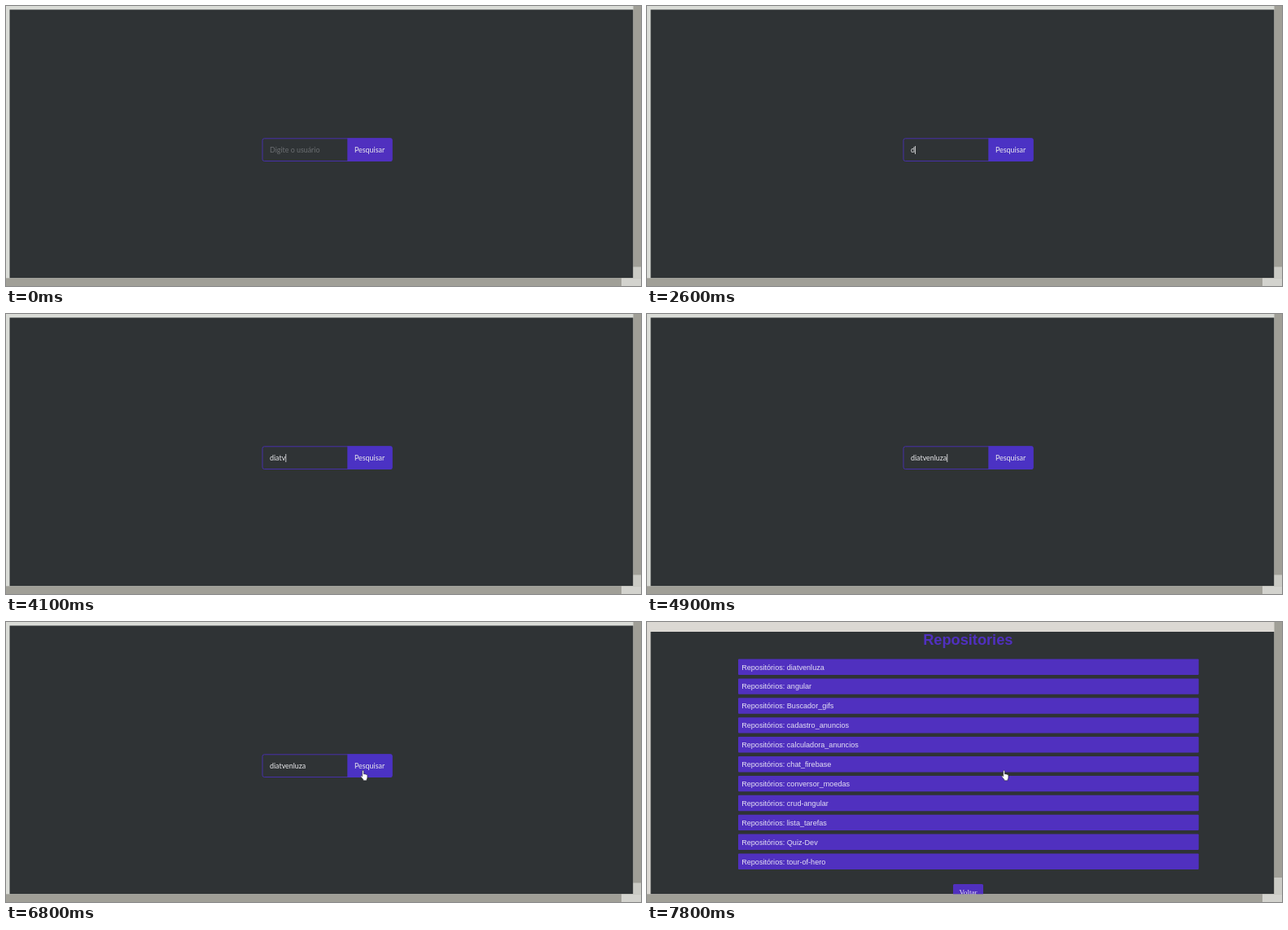
Animation of 780x344 px, one loop 8 s. Source, as an HTML page:

```html
<!DOCTYPE html>
<html lang="pt-BR">
<head>
<meta charset="utf-8">
<title>Buscador de repositórios</title>
<style>
  html, body { margin: 0; width: 100%; height: 100%; overflow: hidden; background: #dadcd7; }
  svg { display: block; width: 780px; height: 344px; }
  .field { font: 8.9px Lato, sans-serif; fill: #e9e9ec; }
  .hint { fill: #6c6f72; }
  .row { font: 9.1px "Liberation Sans", Arial, sans-serif; fill: #e6e2f5; }
  .title { font: bold 18.2px "Liberation Sans", Arial, sans-serif; fill: #5030bf; }
  .back { font: 9.1px "Liberation Serif", Times, serif; fill: #e6e2f5; }
  .accent { fill: #5030bf; }
  .pointer path { fill: #fff; stroke: #1b1b1d; stroke-width: .5; stroke-linejoin: round; }
</style>
</head>
<body>
<svg viewBox="0 0 780 344">
  <rect id="page" width="780" height="344"/>
  <rect id="stage" x="4.5" width="766" fill="#2f3335"/>

  <g id="search">
    <rect x="315" y="162.8" width="159" height="27.7" rx="2.3" fill="none" stroke="#4630a8"/>
    <path id="button" d="M419.3 162.3H472.4a2.3 2.3 0 0 1 2.3 2.3V188.7a2.3 2.3 0 0 1-2.3 2.3H419.3z"/>
    <text class="field" x="428" y="180">Pesquisar</text>
    <text id="hint" class="field hint" x="324" y="180">Digite o usuário</text>
    <text id="typed" class="field" x="324" y="180"></text>
    <path id="spell" d="M328 181.2H367" stroke="#b3294e" stroke-width=".9" stroke-dasharray="1.4 .8" opacity=".75"/>
    <rect id="caret" y="172" width=".8" height="10" fill="#e9e9ec"/>
  </g>

  <g id="results">
    <text class="title" x="394.3" y="28" text-anchor="middle">Repositories</text>
    <g id="rows"></g>
    <rect class="accent" x="376" y="322" width="37" height="20" rx="1.5"/>
    <text class="back" x="394.5" y="335" text-anchor="middle">Voltar</text>
  </g>

  <rect x="770.5" width="9.5" height="344" fill="#a09f97"/>
  <rect y="334.3" width="780" height="9.7" fill="#a09f97"/>
  <rect id="track" x="770.5" width="9.5" fill="#cbcbc5"/>
  <rect x="756" y="334.3" width="24" height="9.7" fill="#d3d3ce"/>

  <g id="pointer" class="pointer">
    <path id="arrow" d="M0 0V10.5L2.5 8.2 4.1 11.8 5.6 11.1 4 7.6H7.3z"/>
    <path id="hand" d="M0 .9a.9.9 0 0 1 1.8 0V4.6q1-.6 1.6.2 1-.5 1.6.4 1.3-.3 1.3 1.1v2.4q0 1.4-.8 2.3V12.5H1.2V11.3L-1.8 7.6q-.2-1.3 1-1l.8.8z"/>
  </g>
</svg>
<script>
const LOOP = 8000, TICK = 100, RESULTS = 7700;
const USER = "diatvenluza";
const REPOS = [USER, "angular", "Buscador_gifs", "cadastro_anuncios", "calculadora_anuncios",
  "chat_firebase", "conversor_moedas", "crud-angular", "lista_tarefas", "Quiz-Dev", "tour-of-hero"];

const KEYS = [2600, 2800, 3000, 3300, 4100, 4300, 4500, 4600, 4700, 4800, 4900];
const CARET = [[1500, 2000], [2600, 3800], [4100, 5500], [6000, 6500]];
const SPELL = [6000, 6800];
// Pointer visits: start, end, then [time, x, y] points
const VISITS = [
  { from: 500, to: 1300, path: [[500, 445.3, 208], [800, 440, 190], [1200, 420, 174]] },
  { from: 6200, to: LOOP, path: [[6200, 422, 179.5], [6500, 437.6, 182.3]] }
];

const $ = id => document.getElementById(id);
const show = (id, on) => $(id).setAttribute("visibility", on ? "visible" : "hidden");
const set = (id, attrs) => { for (const k in attrs) $(id).setAttribute(k, attrs[k]); };
const within = (t, [a, b]) => t >= a && t < b;

$("rows").innerHTML = REPOS.map((name, i) => {
  const y = 45.5 + i * 23.9;
  return `<rect class="accent" x="112" y="${y}" width="565.7" height="19.4" rx="1"/>
    <text class="row" x="116.2" y="${y + 13}">Repositórios: ${name}</text>`;
}).join("");

function along(path, t) {
  for (let i = 1; i < path.length; i++) {
    const [t0, x0, y0] = path[i - 1], [t1, x1, y1] = path[i];
    if (t < t1) {
      const k = (t - t0) / (t1 - t0);
      return [x0 + (x1 - x0) * k, y0 + (y1 - y0) * k];
    }
  }
  return path[path.length - 1].slice(1);
}

function drawPointer(t) {
  const visit = VISITS.find(v => within(t, [v.from, v.to]));
  let overButton = false;
  if (visit) {
    const [x, y] = along(visit.path, t);
    overButton = y <= 191;
    set("pointer", { transform: `translate(${x} ${y})` });
  }
  show("hand", visit && overButton);
  show("arrow", visit && !overButton);
}

function drawSearch(t, on) {
  const count = KEYS.filter(k => k <= t).length;
  const typed = $("typed");
  typed.textContent = USER.slice(0, count);
  const width = count ? typed.getComputedTextLength() : 0;
  set("caret", { x: 324.2 + width });
  set("button", { fill: t < 1700 ? "#5030bf" : "#4b32c4" });
  show("hint", on && !count);
  show("caret", on && CARET.some(span => within(t, span)));
  show("spell", on && within(t, SPELL));
}

function draw(now) {
  const t = Math.floor((now % LOOP) / TICK) * TICK;
  const listing = t >= RESULTS;
  const top = listing ? 12 : 4.5;
  const trackTop = listing ? 314 : 320.5;
  set("page", { fill: listing ? "#dbd8d3" : "#dadcd7" });
  set("stage", { y: top, height: 334.3 - top });
  set("track", { y: trackTop, height: 334.3 - trackTop });
  show("search", !listing);
  show("results", listing);
  drawSearch(t, !listing);
  drawPointer(t);
}

const start = performance.now();
function frame() {
  draw(performance.now() - start);
  requestAnimationFrame(frame);
}
frame();
</script>
</body>
</html>
```
